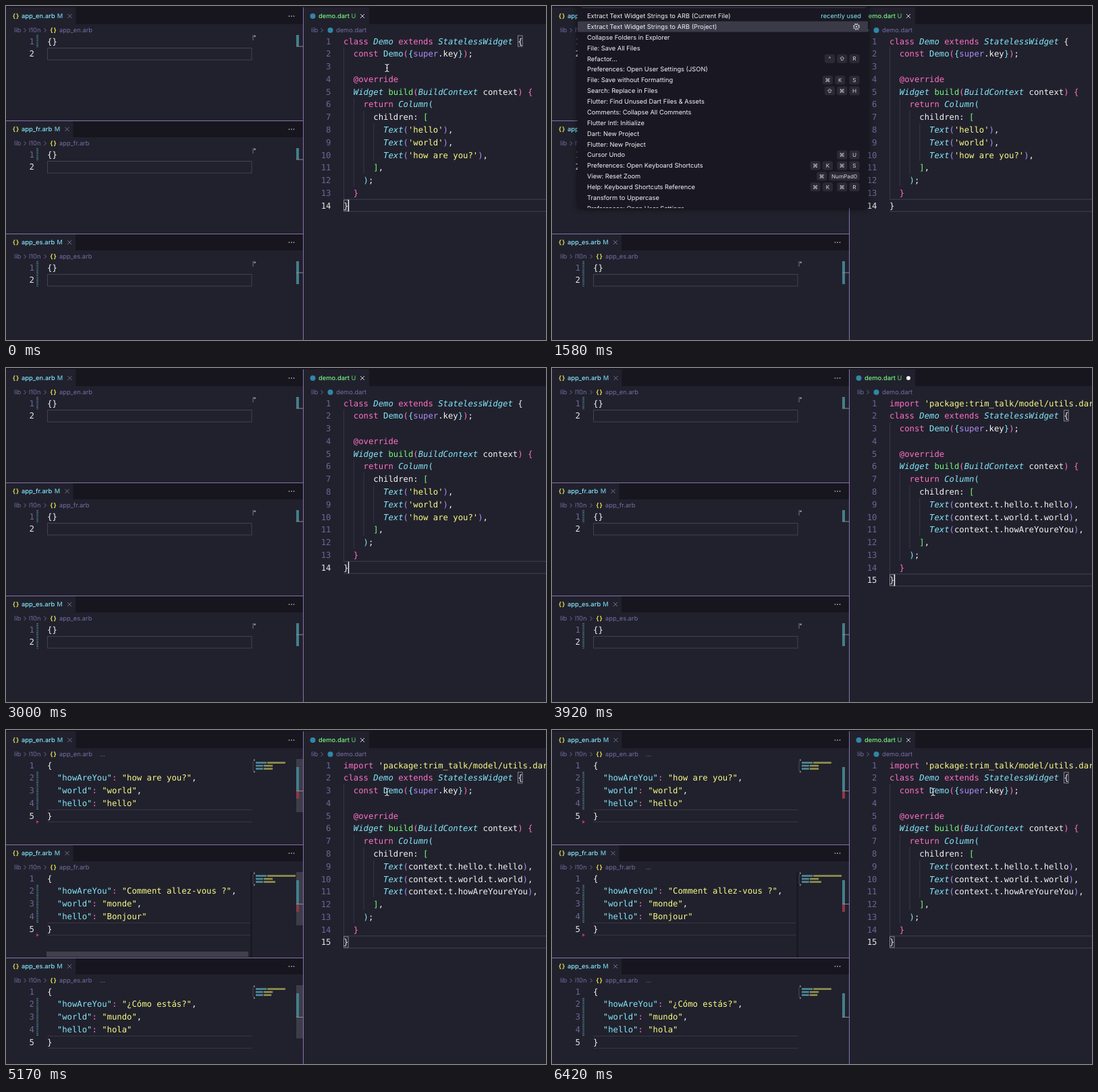
These frames come from a looping animation (800x496 px, 6.5 s). An HTML page:

```html
<!DOCTYPE html>
<html lang="en">
<head>
<meta charset="utf-8">
<title>Extracting strings to ARB files</title>
<style>
  html, body { margin: 0; width: 100%; height: 100%; overflow: hidden; background: #21212d; }
  svg { display: block; }
  #stage { width: 800px; height: 496px; }
  text { font: 9.3px Inter, "Open Sans", sans-serif; text-rendering: geometricPrecision; white-space: pre; fill: #f4f4f6; }
  .code { font: 12.26px "DejaVu Sans Mono", "Liberation Mono", monospace; }
  .code .p { fill: #ff70c4; }
  .code .c, .code .i { fill: #83e8fb; }
  .code .i { font-style: italic; }
  .code .g { fill: #74f77c; }
  .code .v { fill: #b08cfb; }
  .code .y { fill: #fbfb86; }
  .code.num { fill: #6a6798; text-anchor: end; }
  .code.now { fill: #e6e6ec; }
  .crumb { fill: #746ea3; }
  .brace { font-weight: 700; font-size: 9px; letter-spacing: 1px; fill: #e3dc55; text-anchor: middle; }
  .tab { font-weight: 500; }
  .key { font: 8.2px Inter, "DejaVu Sans", sans-serif; text-anchor: middle; fill: #d6d6de; }
  .shadow { filter: drop-shadow(0 1px 4px #0009); }
  .scroll { animation: fade 6500ms linear infinite; }
  @keyframes fade { 0%, 66.6% { opacity: 0 } 66.62%, 83.2% { opacity: 1 } 92%, 100% { opacity: 0 } }
</style>
</head>
<body>
<svg id="stage" viewBox="0 0 800 496"></svg>
<script>
const LOOP = 6500, ROW = 18.78, CHAR = 7.38;
const BG = '#21212d', DARK = '#17161f', LINE = '#424154', SPLIT = '#8672aa', TEAL = '#437f8c';

// Visible spans of each part, in ms.
const spans = {
  palette: [[420, 2830]],
  first: [[0, 1500]],
  second: [[1500, LOOP]],
  mouse: [[0, 1500], [4900, LOOP]],
  before: [[0, 3660]],
  after: [[3660, LOOP]],
  match: [[0, 420], [3080, LOOP]],
  caretA: [[0, 420], [2830, 3330]],
  caretB: [[3660, 4160], [4660, 5160], [5660, 6160]],
  dirty: [[3660, 4330]],
  clean: [[0, 3660], [4330, LOOP]],
  empty: [[0, 4330]],
  filled: [[4330, LOOP]],
  late: [[5500, LOOP]]
};

const pct = ms => (ms / LOOP * 100).toFixed(3) + '%';
const toCss = ([name, list]) => {
  const steps = list.map(([a, b]) => `${pct(a)}{opacity:1}` + (b < LOOP ? `${pct(b)}{opacity:0}` : ''));
  return `@keyframes ${name}{0%{opacity:0}${steps.join('')}}
    .${name}{animation:${name} ${LOOP}ms step-end infinite}`;
};
const style = document.createElement('style');
style.textContent = Object.entries(spans).map(toCss).join('\n');

const esc = s => s.replace(/&/g, '&amp;').replace(/</g, '&lt;');
const g = (cls, ...parts) => `<g class="${cls}">${parts.join('')}</g>`;
const rect = (x, y, w, h, fill, extra = '') =>
  `<rect x="${x}" y="${y}" width="${w}" height="${h}" fill="${fill}" ${extra}/>`;
const frame = (x, y, w, h, color) => rect(x, y, w, h, 'none', `stroke="${color}"`);
const path = (d, color, width = 1) => `<path d="${d}" fill="none" stroke="${color}" stroke-width="${width}"/>`;
const dot = (x, y, r, fill) => `<circle cx="${x}" cy="${y}" r="${r}" fill="${fill}"/>`;
const text = (x, y, s, cls = '', extra = '') =>
  `<text x="${x}" y="${y + 3.3}" class="${cls}" ${extra}>${esc(s)}</text>`;
const chevron = (x, y) => path(`M${x - 1.5} ${y - 3}l3 3l-3 3`, '#746ea3', .9);
const cross = (x, y, color) => path(`M${x - 3} ${y - 3}l6 6m0 -6l-6 6`, color, .9);
const dots = (x, y) => [-3.5, 0, 3.5].map(d => dot(x + d, y, .85, '#c9c9d2')).join('');

// Code lines use "~k" to switch to colour class k.
const codeLine = (x, mid, line) => {
  const runs = line.split('~').map((run, i) => i
    ? `<tspan class="${run[0]}">${esc(run.slice(1))}</tspan>` : esc(run));
  return `<text class="code" x="${x}" y="${mid + 4.5}">${runs.join('')}</text>`;
};
const code = (x, mid, lines) => lines.map((s, i) => codeLine(x, mid + i * ROW, s)).join('');
const numbers = (x, mid, count) => Array.from({ length: count }, (_, i) =>
  `<text class="code num ${i === count - 1 ? 'now' : ''}" x="${x}" y="${mid + i * ROW + 4.5}">${i + 1}</text>`).join('');
const changed = (y, h) =>
  `<path d="M46.5 ${y}v${h}" stroke="#47707c" stroke-width="3" stroke-dasharray="1.3 1.3"/>`;

function arbPane({ name, mark, entries, emptyRows, red, wide }, index) {
  const top = 2 + index * 168, tabY = top + 13, crumbY = top + 34, mid = top + 50;
  const close = mark + 14.5;
  const json = ['{', ...entries.map(([k, v], i) =>
    `  ~c"${k}"~p:~w ~y"${v}"~w${i < 2 ? ',' : ''}`), '}'];
  const minimap = entries.map(([k, v], i) => {
    const y = top + 45.3 + i * 4.5, w = (k.length + 3) * 1.35;
    return rect(370, y, w, 2.6, '#4f8d9b') + rect(371 + w, y, (v.length + 2) * 1.9, 2.6, '#94944f');
  }).join('');
  const tail = extra => g(extra, text(139, crumbY, '...', 'crumb'));
  return [
    rect(0, top, 440, 25, DARK),
    rect(0, top, close + 9, 25, BG),
    index ? path(`M0 ${top + .5}H440`, SPLIT) : '',
    text(15, tabY, '{}', 'brace'),
    text(23, tabY, name, 'tab', 'style="fill:#83e8fb"'),
    text(mark, tabY, 'M', 'tab', 'text-anchor="middle" style="fill:#6fc5d8"'),
    cross(close, tabY, '#77759a'),
    dots(423, tabY),
    text(12, crumbY, 'lib', 'crumb'), chevron(28, crumbY),
    text(34, crumbY, 'l10n', 'crumb'), chevron(58, crumbY),
    text(70.5, crumbY, '{}', 'brace'),
    text(79, crumbY, name, 'crumb'),
    g('empty',
      changed(top + 41, emptyRows * ROW), numbers(42, mid, 2), code(61, mid, ['{}']),
      frame(61.5, top + 60.5, 302.5, 17.5, LINE),
      path(`M366 ${top + 41}v8`, '#777684'), rect(367.3, top + 41.5, 2.5, 2.5, '#8f8f9a'),
      rect(430, top + 41, 4, emptyRows * 17, TEAL),
      path(`M430 ${top + 58}h10`, '#8d8d97')),
    g('filled',
      changed(top + 60, ROW * 3), numbers(42, mid, 5), code(61, mid, json),
      path(`M61 ${top + 116.5}H364M61 ${top + 134.5}H364`, '#373645'),
      red ? `<path d="M45 ${top + 132}l4 2.5l-4 2.5z" fill="#b93a50"/>` : '',
      path(`M366 ${top + 44}v15`, '#4a4958'),
      rect(367, top + 41.5, 1.5, 2.4, '#9a9aa4'), rect(367, top + 58.8, 1.5, 2.4, '#9a9aa4'), minimap,
      wide ? rect(362, top + 41, 3, 127, '#191922') : '',
      g('scroll', rect(430, top + 41, 10, 79, '#3d3c49'),
        wide ? rect(60, top + 159, 299, 8, '#403f4b') : ''),
      rect(430, top + 53, 4, 36, TEAL),
      red ? rect(430, top + 89, 4, 11, '#8e3748') : '',
      path(`M430 ${top + 88.5}h10`, '#8d8d97')),
    tail(wide ? 'late' : 'filled')
  ].join('');
}

const arb = (how, world, hello) => [['howAreYou', how], ['world', world], ['hello', hello]];
const panes = [
  { name: 'app_en.arb', mark: 80, entries: arb('how are you?', 'world', 'hello'), emptyRows: 1, red: true },
  { name: 'app_fr.arb', mark: 76, entries: arb('Comment allez-vous ?', 'monde', 'Bonjour'), emptyRows: 1, red: true, wide: true },
  { name: 'app_es.arb', mark: 79.5, entries: arb('¿Cómo estás?', 'mundo', 'hola'), emptyRows: 2 }
];

const demo = args => [
  '~pclass ~iDemo ~pextends ~iStatelessWidget ~w{',
  '  ~pconst ~cDemo~p(~c{~vsuper~w.key~c}~p)~w;',
  '',
  '  ~p@override',
  '  ~iWidget ~gbuild~p(~iBuildContext~w context~p) {',
  '    ~preturn ~iColumn~c(',
  '      children~w: ~g[',
  ...args.map(a => `        ~iText~v(${a}~v)~w,`),
  '      ~g]~w,',
  '    ~c)~w;',
  '  ~p}',
  '}'
].map(s => s.replace('~vsuper', '~vsuper'));

function dartCode(lines, shift, caret) {
  const last = 52 + (lines.length - 1) * ROW, first = 52 + shift * ROW;
  const guide = (level, from, to) =>
    path(`M${500.5 + level * 2 * CHAR} ${first + (from - 1.5) * ROW}V${first + (to - .5) * ROW}`, '#37364a');
  return [
    guide(0, 2, 13), guide(1, 6, 12), guide(2, 7, 11), guide(3, 8, 10),
    path(`M500 ${last - 9}H800M500 ${last + 9}H800`, LINE),
    g('match', frame(758.5, first - 8, 6.6, 16, '#85858f'), frame(500.5, last - 8, 6.6, 16, '#85858f')),
    numbers(481.5, 52, lines.length), code(500, 52, lines),
    g(caret, rect(506.8, last - 8.5, 1.4, 17.5, '#f4f4f6'))
  ].join('');
}

function dartPane() {
  const oldArgs = ['hello', 'world', 'how are you?'].map(s => `~y'${s}'`);
  const newArgs = ['hello.t.hello', 'world.t.world', 'howAreYoureYou'].map(s => `~wcontext.t.${s}`);
  return [
    rect(441, 2, 359, 25, DARK), rect(441, 2, 97, 25, BG),
    path('M440.5 2V496', SPLIT),
    dot(454.5, 15, 4, '#3186a6'),
    text(463, 15, 'demo.dart', 'tab', 'style="fill:#74f77c"'),
    text(515, 15, 'U', 'tab', 'text-anchor="middle" style="fill:#56bd62"'),
    g('clean', cross(528, 15, '#e6e6ec')),
    g('dirty', dot(528, 15, 3, '#f4f4f6')),
    text(452, 36, 'lib', 'crumb'), chevron(468, 36),
    dot(480.5, 36, 4, '#3186a6'), text(489, 36, 'demo.dart', 'crumb'),
    g('before', dartCode(demo(oldArgs), 0, 'caretA')),
    g('after', dartCode(["~pimport ~y'package:trim_talk/model/utils.dart'~w;", ...demo(newArgs)], 1, 'caretB'))
  ].join('');
}

// Label, then shortcut keys; a comma separates chords.
const commands = [
  'Extract Text Widget Strings to ARB (Current File)',
  'Extract Text Widget Strings to ARB (Project)',
  'Collapse Folders in Explorer',
  'File: Save All Files',
  'Refactor...|^ ⇧ R',
  'Preferences: Open User Settings (JSON)',
  'File: Save without Formatting|⌘ K , S',
  'Search: Replace in Files|⇧ ⌘ H',
  'Flutter: Find Unused Dart Files & Assets',
  'Comments: Collapse All Comments',
  'Flutter Intl: Initialize',
  'Dart: New Project',
  'Flutter: New Project',
  'Cursor Undo|⌘ U',
  'Preferences: Open Keyboard Shortcuts|⌘ K , ⌘ S',
  'View: Reset Zoom|⌘ NumPad0',
  'Help: Keyboard Shortcuts Reference|⌘ K , ⌘ R',
  'Transform to Uppercase',
  'Preferences: Open User Settings'
];

function keys(list, y) {
  let right = 455, out = '';
  for (const key of list.split(' ').reverse()) {
    if (key === ',') { right -= 3; continue; }
    const w = key.length > 1 ? 44 : 14;
    out += rect(right - w, y - 6, w, 12, '#2a2934', 'rx="2" stroke="#34333f" stroke-width=".7"')
      + text(right - w / 2, y - .3, key, 'key');
    right -= w + 4.3;
  }
  return out;
}

const gear = y => path(`M451 ${y - 3.4}a3.4 3.4 0 1 1 -.01 0z`, '#d6d6de', 1)
  + `<circle cx="451" cy="${y}" r="4.5" fill="none" stroke="#d6d6de" stroke-width="1.1" stroke-dasharray="1.7 1.83"/>`
  + dot(451, y, 1.2, '#d6d6de');

function palette() {
  const rowY = i => 14.8 + i * 15.87;
  const chosen = i => rect(38, rowY(i) - 8, 430, 15.9, '#3a3a48') + gear(rowY(i));
  const recent = (x, color) => text(x, rowY(0), 'recently used', '', `text-anchor="end" style="fill:${color}"`);
  const rows = commands.map((item, i) => {
    const [label, list] = item.split('|');
    return text(52, rowY(i), label) + (list ? keys(list, rowY(i)) : '');
  }).join('');
  return g('palette',
    rect(38, -4, 430, 304, '#191822', 'class="shadow"'),
    '<svg x="38" y="0" width="430" height="300" viewBox="38 0 430 300">',
    path('M44 2.5H464', '#3b3a4a'),
    g('first', chosen(0), recent(440.5, '#f4f4f6')),
    g('second', chosen(1), recent(458, '#83e8fb')),
    rows, '</svg>');
}

const beam = 'M561.5 86.5q3 0 3 2.2v6.6q0 2.2 -3 2.2M567.5 86.5q-3 0 -3 2.2v6.6q0 2.2 3 2.2M563 92h3';

document.head.append(style);
document.getElementById('stage').innerHTML = [
  rect(0, 0, 800, 496, BG), rect(0, 0, 800, 2, DARK),
  panes.map(arbPane).join(''),
  dartPane(),
  palette(),
  g('mouse', path(beam, '#15151c', 2.4), path(beam, '#e9e9ee', 1.1))
].join('');
</script>
</body>
</html>
```
